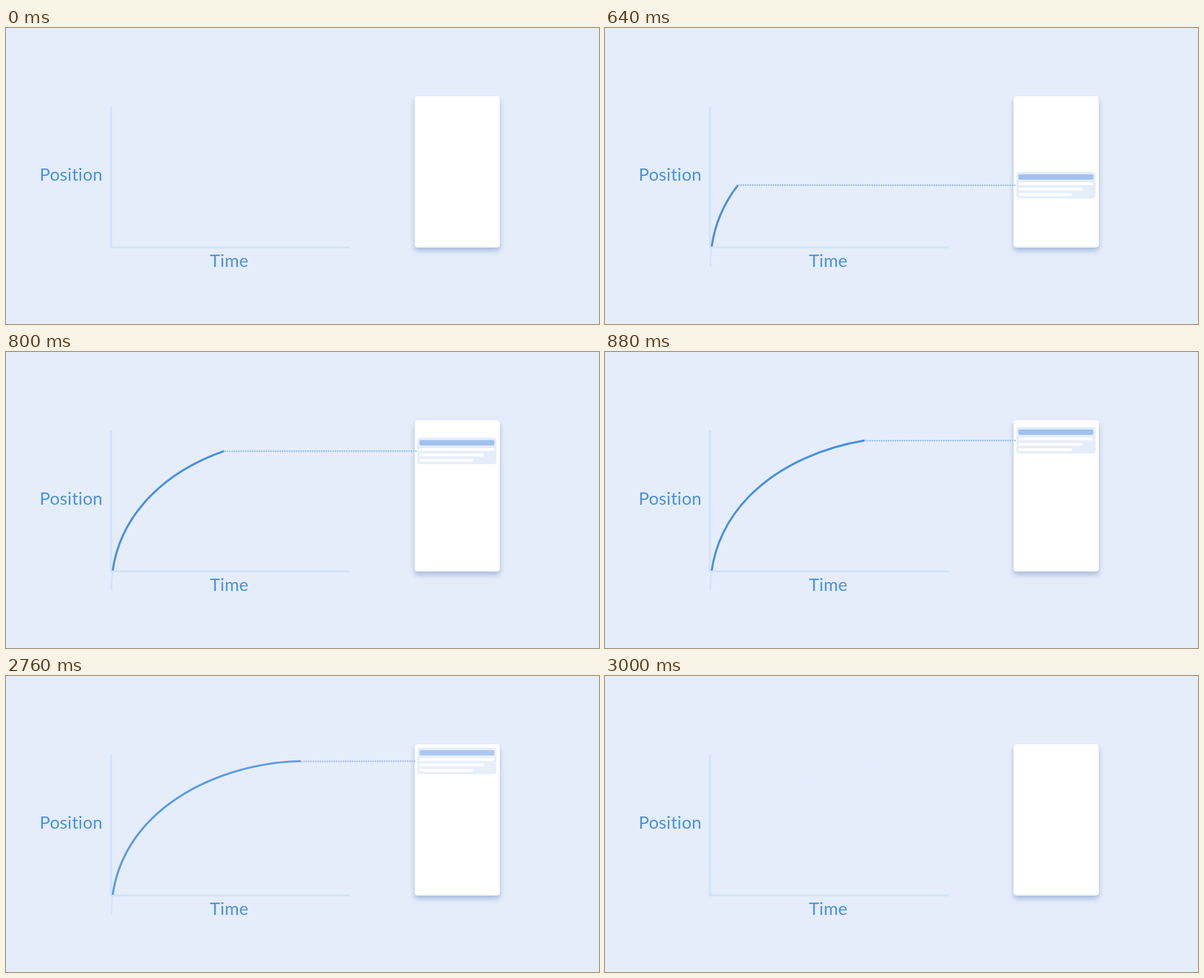
These frames come from a looping animation (1058 px wide and 529 px high, 3.04 s). An HTML page:

```html
<!DOCTYPE html>
<html lang="en">
<head>
<meta charset="utf-8">
<title>Ease-out curve</title>
<style>
  html, body { margin: 0; width: 100%; height: 100%; overflow: hidden; background: #e5edfb; }
  svg { display: block; width: 1058px; height: 529px; }
  text { font: 31px Lato, "Open Sans", sans-serif; letter-spacing: .35px; fill: #4a90e2; }
  .phone { filter: drop-shadow(0 6.5px 5px rgba(85, 120, 172, .42)); }
  .curve { fill: none; stroke: #4a90e2; stroke-width: 3.7; }
  .tail { fill: none; stroke: #d6e5f8; stroke-width: 3.5; }
  .dots { stroke: #9fc0ec; stroke-width: 3.3; stroke-linecap: round; stroke-dasharray: 0 4.1; }
</style>
</head>
<body>
<svg viewBox="0 0 1058 529">
  <defs>
    <clipPath id="above"><rect width="1058" height="390.5"/></clipPath>
    <clipPath id="below"><rect y="393.5" width="1058" height="135"/></clipPath>
  </defs>
  <path d="M187.3 140V392H613.5" fill="none" stroke="#d2e4f7" stroke-width="4"/>
  <text x="60" y="273">Position</text>
  <text x="363.8" y="427">Time</text>
  <rect class="phone" x="729" y="122" width="152" height="270.3" rx="5" fill="#fff"/>
  <g id="live" opacity="0">
    <path class="tail" clip-path="url(#below)"/>
    <g id="card">
      <rect x="734" width="141.3" height="47.5" rx="5" fill="#e5edfb"/>
      <rect x="737.8" y="4.5" width="133.4" height="9.6" rx="2" fill="#a0c1ee"/>
      <g fill="#fff">
        <rect x="737.5" y="18.8" width="133.7" height="5" rx="2.4"/>
        <rect x="737.5" y="28.4" width="115" height="5" rx="2.4"/>
        <rect x="737.5" y="38" width="95.5" height="5" rx="2.4"/>
      </g>
    </g>
    <line class="dots" x2="732"/>
    <path class="curve" clip-path="url(#above)"/>
  </g>
</svg>
<script>
  const LOOP = 3040, STEP = 40, RISE = 600, FADE = 2760;
  const bezier = [[188, 427], [187, 252], [362, 156.3], [526, 152]];
  const tipX = [204.5, 237, 272, 308.5, 348, 389, 427, 463, 496, 526];

  const $ = q => document.querySelector(q);
  const live = $('#live'), card = $('#card');
  const curve = $('.curve'), tail = $('.tail'), dots = $('.dots');

  const mix = (a, b, u) => a.map((v, i) => v + (b[i] - v) * u);

  // Control points of the part of the curve from 0 to u
  function head(u) {
    const out = [];
    let row = bezier;
    while (row.length) {
      out.push(row[0]);
      row = row.slice(1).map((p, i) => mix(row[i], p, u));
    }
    return out;
  }

  function headTo(x) {
    let lo = 0, hi = 1;
    for (let i = 0; i < 24; i++) {
      const mid = (lo + hi) / 2;
      if (head(mid)[3][0] < x) lo = mid; else hi = mid;
    }
    return head(hi);
  }

  function pose(k) {
    const pts = headTo(tipX[k]);
    const [x, y] = pts[3];
    const d = `M${pts[0]}C${pts.slice(1).join(' ')}`;
    curve.setAttribute('d', d);
    tail.setAttribute('d', d);
    card.setAttribute('transform', `translate(0 ${y - 24.1})`);
    dots.setAttribute('x1', x + 2);
    dots.setAttribute('y1', y - 0.6 + 1.4 * k / 9);
    dots.setAttribute('y2', y);
  }

  function opacity(t) {
    if (t < RISE || t >= FADE + 7 * STEP) return 0;
    if (t < FADE) return 1;
    return 0.88 - 0.145 * Math.floor((t - FADE) / STEP);
  }

  const start = performance.now();
  function draw() {
    const t = (performance.now() - start) % LOOP;
    const k = Math.floor((t - RISE) / STEP);
    pose(Math.max(0, Math.min(9, k)));
    live.setAttribute('opacity', opacity(t));
    requestAnimationFrame(draw);
  }
  draw();
</script>
</body>
</html>
```
